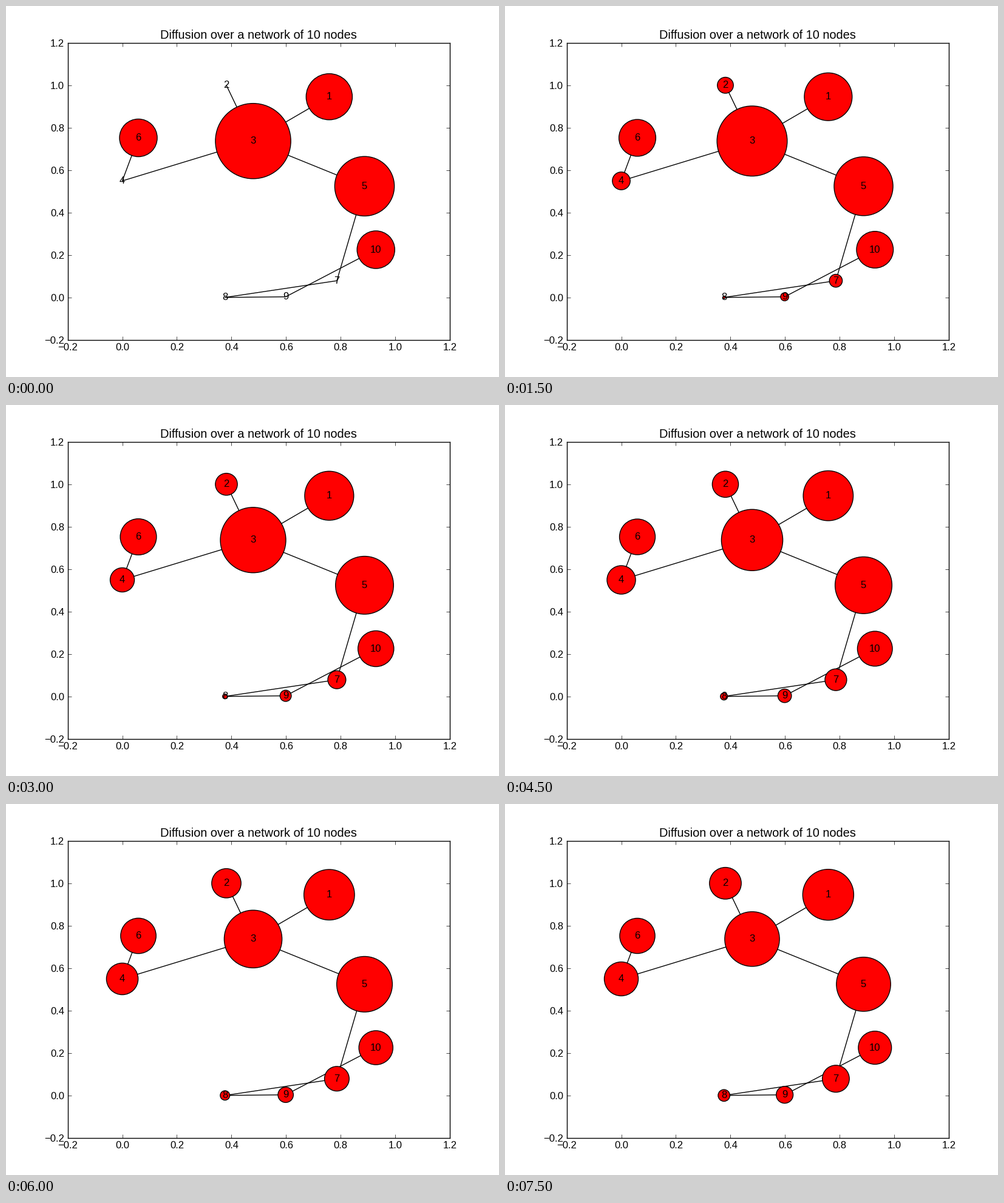
Recreate the animation shown at these times as a matplotlib script. Size 812 px wide and 612 px high, loop 8000 ms.

```python
import numpy as np
import matplotlib.pyplot as plt
from matplotlib.animation import FuncAnimation
from matplotlib.collections import LineCollection

W, H, DPI = 812, 612, 100
FRAME_MS, FRAMES, HOLD = 500, 16, 3

POS = np.array([
    (0.7578, 0.9459), (0.3812, 1.0), (0.4791, 0.7371), (0.0, 0.5493),
    (0.8871, 0.5241), (0.0589, 0.7521), (0.7857, 0.0787), (0.3761, 0.0),
    (0.5983, 0.0030), (0.9288, 0.2250),
])
EDGES = [(1, 3), (2, 3), (3, 4), (3, 5), (4, 6), (5, 7), (7, 8), (8, 9), (9, 10)]
START = 1000.0 * np.array([3, 0, 8, 0, 5, 2, 0, 0, 0, 2])

# Graph Laplacian, diagonalised once for the heat equation x' = -L x
lap = np.zeros((10, 10))
for a, b in EDGES:
    lap[[a - 1, b - 1], [a - 1, b - 1]] += 1
    lap[[a - 1, b - 1], [b - 1, a - 1]] -= 1
rates, modes = np.linalg.eigh(lap)


def amounts(step):
    """Quantity held by every node; the time steps grow by 8 percent."""
    if step == 0:
        return START
    t = 0.625 * (1.08 ** step - 1)
    return np.maximum(modes @ (np.exp(-rates * t) * (modes.T @ START)), 0)


plt.rcParams.update({
    "font.family": "Liberation Sans",
    "font.size": 12,
    "axes.linewidth": 1.0,
    "axes.unicode_minus": True,
})

# The tiny surplus keeps the pixel size from being rounded down
fig = plt.figure(figsize=((W + 0.001) / DPI, (H + 0.001) / DPI), dpi=DPI,
                 facecolor="white")
ax = fig.add_axes([101.5625 / W, 61.25 / H, 629.6875 / W, 490 / H])
ax.set_xlim(-0.2, 1.2)
ax.set_ylim(-0.2, 1.2)
ticks = np.linspace(-0.2, 1.2, 8).round(1)
labels = [f"{abs(v):.1f}" if v >= 0 else f"\u2212{-v:.1f}" for v in ticks]
ax.set_xticks(ticks, labels)
ax.set_yticks(ticks, labels)
ax.tick_params(direction="in", length=4, width=0.5, pad=4, top=True, right=True)
ax.set_title("Diffusion over a network of 10 nodes", fontsize=14.4, pad=5)

ax.add_collection(LineCollection(
    [POS[[a - 1, b - 1]] for a, b in EDGES],
    colors="black", linewidths=1.0, zorder=1), autolim=False)
nodes = ax.scatter(POS[:, 0], POS[:, 1], s=START, c="red",
                   edgecolors="black", linewidths=1.0, zorder=2)
for i, (x, y) in enumerate(POS, 1):
    ax.text(x, y, str(i), ha="center", va="center", zorder=3)


def draw(frame):
    nodes.set_sizes(amounts(frame // HOLD), DPI)
    return nodes,


anim = FuncAnimation(fig, draw, frames=FRAMES, interval=FRAME_MS,
                     init_func=lambda: draw(0), repeat=True, repeat_delay=0)
plt.show()
```
